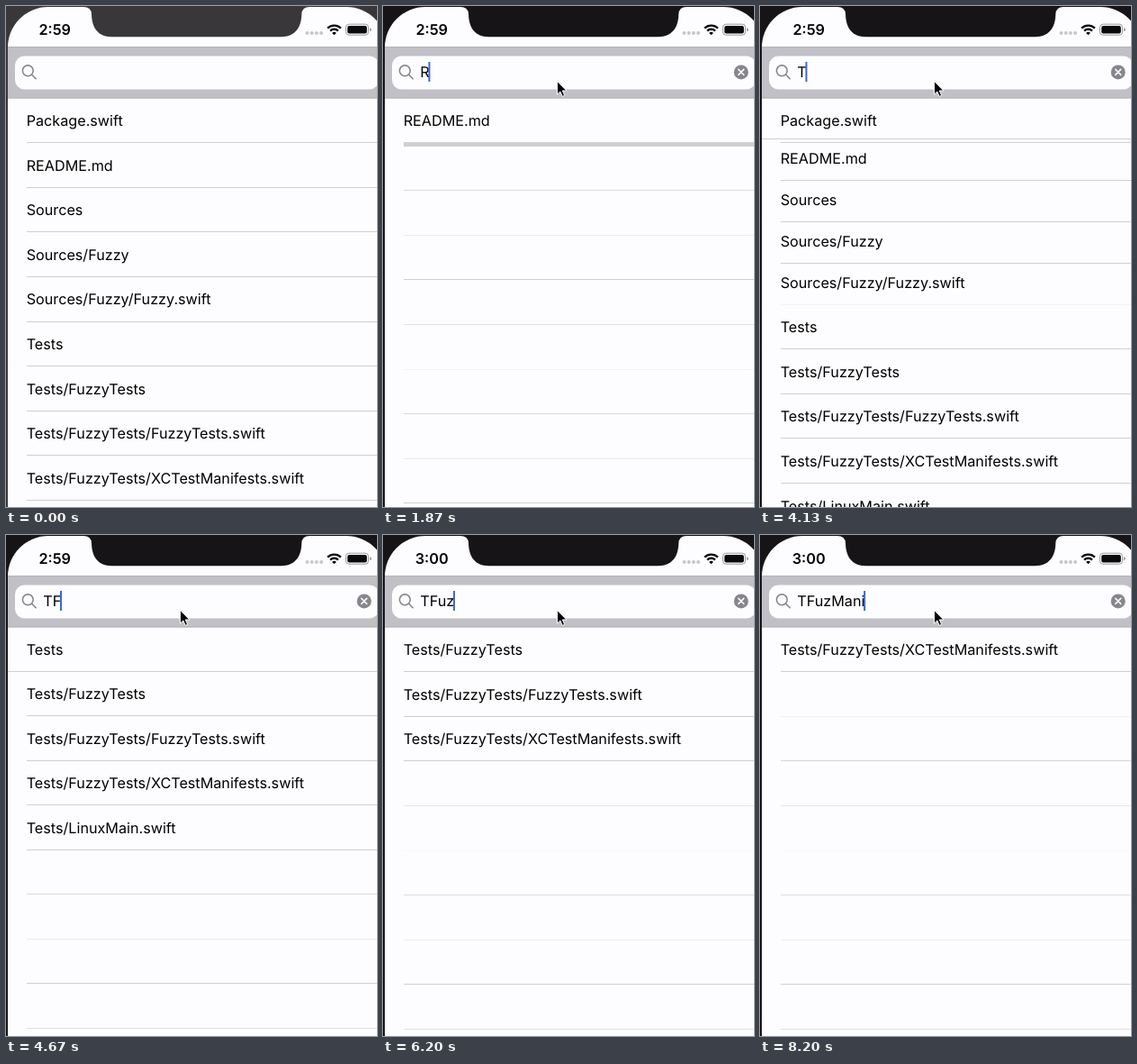
Recreate the animation shown at these times as an HTML page. Size 412 by 556 pixels, loop 8.54 s.

```html
<!DOCTYPE html>
<html lang="en">
<head>
<meta charset="utf-8">
<title>Fuzzy file search</title>
<style>
  html, body { margin: 0; width: 100%; height: 100%; overflow: hidden; background: #fdfcfe; }
  svg { display: block; }
  text {
    font: 16.18px Inter, "Liberation Sans", sans-serif; fill: #000;
    white-space: pre; text-rendering: geometricPrecision;
  }
  #clock { font-size: 16.2px; font-weight: 600; text-anchor: middle; }
  .line { fill: #cfced3; shape-rendering: crispEdges; }
  .paper { fill: #fdfcfe; }
  .blue { fill: #3a68d6; }
</style>
</head>
<body>
<svg id="stage" width="412" height="556" viewBox="0 0 412 556">
  <rect class="paper" width="412" height="556"/>
  <g id="blanks"></g>
  <g id="list"></g>
  <rect id="edge" class="line" x="2" width="410" height="1"/>

  <rect class="paper" width="412" height="46"/>
  <rect y="45" width="412" height="57.5" fill="#c1c0c7"/>
  <rect y="45" width="412" height="1" fill="#b5b4ba"/>
  <rect y="101.5" width="412" height="1" fill="#b5b4ba"/>
  <rect class="paper" x="10" y="55.5" width="404" height="37" rx="10.5"/>
  <g fill="none" stroke="#87868b" stroke-width="1.6" stroke-linecap="round">
    <circle cx="24.3" cy="71.8" r="5.9"/>
    <path d="M28.7 76.2L33.2 80.7"/>
  </g>
  <rect id="mark" class="blue" x="41" y="62" width="30" height="22" opacity=".2"/>
  <text id="query" x="41.3" y="79"></text>
  <g id="grips" class="blue">
    <circle cx="41" cy="57.3" r="4.8"/>
    <rect x="40" y="62" width="2" height="22"/>
    <rect x="70" y="64" width="2" height="20"/>
    <circle cx="71" cy="89" r="4.8"/>
  </g>
  <rect id="caret" class="blue" y="62" width="2" height="22"/>
  <g id="clear">
    <circle cx="397.7" cy="73.4" r="8" fill="#87868b"/>
    <path d="M394.7 70.4l6 6m0-6l-6 6" stroke="#fdfcfe" stroke-width="1.5" stroke-linecap="round"/>
  </g>

  <text id="clock" x="54.2" y="32"></text>
  <g fill="#c7c6cb">
    <circle cx="334.5" cy="30" r="2"/><circle cx="339.7" cy="30" r="2"/>
    <circle cx="344.9" cy="30" r="2"/><circle cx="350.1" cy="30" r="2"/>
  </g>
  <g fill="none" stroke="#0a090b" stroke-width="2.3">
    <path d="M357.1 24.6a10.5 10.5 0 0 1 14.8 0"/>
    <path d="M360.1 27.6a6.2 6.2 0 0 1 8.8 0"/>
  </g>
  <path d="M364.5 32.3l-2.4 -2.4a3.4 3.4 0 0 1 4.8 0z" fill="#0a090b"/>
  <rect x="377.5" y="20.2" width="25" height="12" rx="3.4" fill="none" stroke="#97969b"/>
  <rect x="379.2" y="21.9" width="21.6" height="8.6" rx="2" fill="#0a090b"/>
  <path d="M404 24.2q1.8.6 1.8 2t-1.8 2z" fill="#97969b"/>

  <g id="bezel">
    <path fill-rule="evenodd" d="M0 0H430V560H0zM2 570V46A45 45 0 0 1 47 1H378A45 45 0 0 1 423 46V570z"/>
    <path d="M86 0V1Q94.5 1 95 9C95.3 25 103 34.2 117 34.2H306C320 34.2 328 25 328.3 9Q328.8 1 337 1V0z"/>
  </g>
  <path id="mouse" d="M0 0V14.8L3.4 11.6L5.8 17L8.2 15.9L5.9 10.6H10.4z" fill="#050406" stroke="#fff" stroke-width="1"/>
</svg>
<script>
const LOOP = 8540, TOP = 102, ROW = 49.62, ANIM = 300;
const SELECT = 3000, ERASE = 3260, ACTIVE = 1000;
const FILES = [
  "Package.swift", "README.md", "Sources", "Sources/Fuzzy", "Sources/Fuzzy/Fuzzy.swift",
  "Tests", "Tests/FuzzyTests", "Tests/FuzzyTests/FuzzyTests.swift",
  "Tests/FuzzyTests/XCTestManifests.swift", "Tests/LinuxMain.swift"
];
// time of each edit and the query after it; the first only sets the blink phase
const EDITS = [
  [-835, ""], [1590, "R"], [2000, "RE"], [2320, "REA"], [ERASE, ""], [4073, "T"],
  [4650, "TF"], [4850, "TFu"], [5060, "TFuz"], [6726, "TFuzM"], [6890, "TFuzMa"],
  [6990, "TFuzMan"], [7060, "TFuzMani"]
];

const $ = id => document.getElementById(id);
const clamp = x => Math.min(1, Math.max(0, x));
const ramp = (t, from, span) => clamp((t - from) / span);

function add(parent, tag, attrs, text = "") {
  const el = document.createElementNS("http://www.w3.org/2000/svg", tag);
  for (const key in attrs) el.setAttribute(key, attrs[key]);
  el.textContent = text;
  return parent.appendChild(el);
}

// the standard ease-in-out curve
function ease(x) {
  let lo = 0, hi = 1;
  for (let i = 0; i < 20; i++) {
    const u = (lo + hi) / 2, v = 1 - u;
    if (3 * v * v * u * .42 + 3 * v * u * u * .58 + u * u * u < x) lo = u; else hi = u;
  }
  return lo * lo * (3 - 2 * lo);
}

function matches(name, query) {
  let at = 0;
  for (const ch of query) {
    at = name.indexOf(ch, at) + 1;
    if (!at) return false;
  }
  return true;
}

const filter = query => FILES.map(name => matches(name, query));

// list changes: only the edits that alter the set of visible rows
const changes = [];
EDITS.forEach(([time, query], i) => {
  const to = filter(query), from = i ? filter(EDITS[i - 1][1]) : to;
  if (!i || to.some((on, k) => on !== from[k])) changes.push({ time, from, to });
});

const latest = (items, test) => items.filter(test).pop();
const move = (el, x, y) => el.setAttribute("transform", `translate(${x} ${y})`);
const show = (el, alpha) => el.setAttribute("opacity", alpha);

function makeRow(parent, name) {
  const g = add(parent, "g", {});
  add(g, "rect", { class: "paper", x: 2, width: 410, height: ROW });
  if (name) add(g, "text", { x: 22.7, y: 31 }, name);
  add(g, "rect", { class: "line", x: 22.5, y: ROW - 0.6, width: 390, height: 1 });
  return g;
}

// staying rows lie above leaving ones; among each, earlier rows lie on top
const under = add($("list"), "g", {}), over = add($("list"), "g", {});
const rows = FILES.map(name => makeRow(under, name));
const blanks = Array.from({ length: 10 }, () => makeRow($("blanks")));

let layered = null;
function layer(change) {
  if (layered === change) return;
  layered = change;
  rows.forEach((row, i) => {
    const group = change.from[i] && change.to[i] ? over : under;
    group.insertBefore(row, group.firstChild);
  });
}

function drawList(t) {
  const change = latest(changes, c => c.time <= t);
  const p = ease(ramp(t, change.time, ANIM));
  layer(change);
  let y = TOP, edgeY = 0;
  rows.forEach((row, i) => {
    const was = change.from[i], is = change.to[i];
    const h = ROW * (was && is ? 1 : was ? 1 - p : is ? p : 0);
    const first = (was || is) && y === TOP;
    row.style.display = h > 0.01 ? "" : "none";
    move(row, 0, first ? TOP : y + h - ROW);
    if (first && was !== is && !edgeY) edgeY = y + h;
    y += h;
  });
  $("edge").setAttribute("y", edgeY - 0.5);
  show($("edge"), edgeY && p < 1 ? clamp(1.2 - 2 * p) : 0);
  blanks.forEach((row, i) => move(row, 0, y + i * ROW));
}

function drawField(t) {
  const [time, query] = latest(EDITS, e => e[0] <= t);
  const selected = t >= SELECT && t < ERASE;
  const text = $("query");
  if (text.textContent !== query) text.textContent = query;
  const width = query ? text.getComputedTextLength() : 0;
  $("caret").setAttribute("x", 40 + width);
  const beat = t - time < 500 ? 0 : (t - time - 500) % 1000 + 1;
  const blink = beat ? 1 - ramp(beat, 0, 230) + ramp(beat, 400, 230) : 1;
  show($("caret"), selected ? 0 : blink);
  show($("mark"), selected ? .2 : 0);
  show($("grips"), t < SELECT ? 0 : 1 - ramp(t, ERASE, 130));
  show($("clear"), query ? 1 : 0);
}

function drawFrame(t) {
  $("clock").textContent = t < 5395 ? "2:59" : "3:00";
  $("bezel").setAttribute("fill", t < ACTIVE ? "#3a373b" : "#171418");
  const away = 1 - ease(ramp(t, 760, 300));
  move($("mouse"), 193.4 + 40 * away, 83.4 + 480 * away);
}

function tick() {
  const t = performance.now() % LOOP;
  drawList(t);
  drawField(t);
  drawFrame(t);
  requestAnimationFrame(tick);
}
tick();
</script>
</body>
</html>
```
